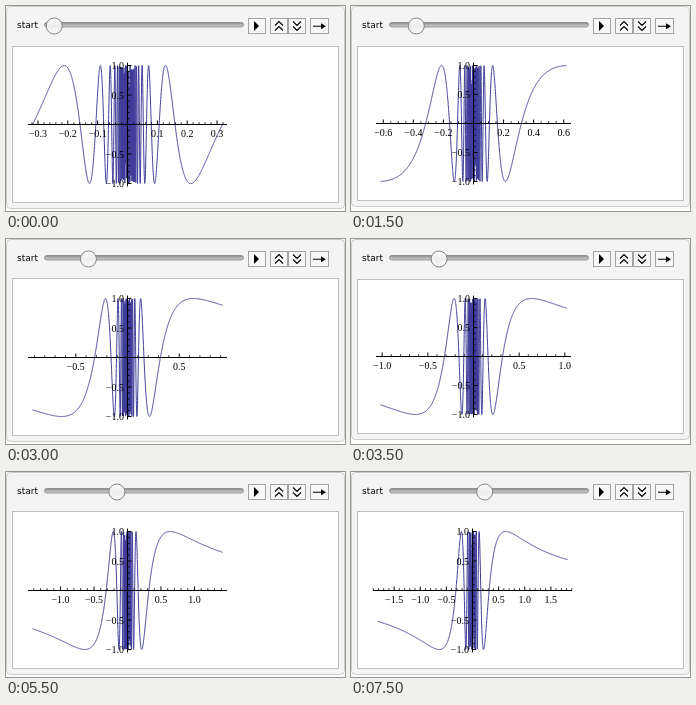
Recreate the animation shown at these times as an HTML page. Size 339 by 205 pixels, loop 8000 ms.

```html
<!DOCTYPE html>
<html lang="en">
<head>
<meta charset="utf-8">
<title>sin(1/x) explorer</title>
<style>
  html, body { margin: 0; width: 100%; height: 100%; overflow: hidden; background: #fff; }
  svg { display: block; width: 339px; height: 205px; }
  .label { font: 9px "DejaVu Sans", sans-serif; }
  .ticks text { font: 10px "Liberation Serif", serif; }
  #curve { fill: none; stroke: #3f3d99; stroke-width: 1; stroke-linejoin: round; }
  #axes { fill: none; stroke: #000; stroke-width: 1; }
  #minor { fill: none; stroke: #000; stroke-width: .8; }
  .button rect { fill: #f7f7f7; stroke: #a3a3a3; }
  .icon { fill: none; stroke: #000; stroke-width: 1.1; }
</style>
</head>
<body>
<svg viewBox="0 0 339 205">
  <defs>
    <linearGradient id="groove" x2="0" y2="1">
      <stop offset="0" stop-color="#858585"/>
      <stop offset=".5" stop-color="#b4b4b4"/>
      <stop offset="1" stop-color="#d2d2d2"/>
    </linearGradient>
    <linearGradient id="knob" x2="0" y2="1">
      <stop offset="0" stop-color="#fff"/>
      <stop offset=".5" stop-color="#ededed"/>
      <stop offset="1" stop-color="#fafafa"/>
    </linearGradient>
  </defs>

  <rect id="frame" x=".5" y=".5" width="338" rx="4" fill="#f4f4f4" stroke="#cbcbcb"/>
  <rect id="panel" x="6.5" width="326" fill="#fff" stroke="#c0c0c0"/>

  <text class="label" x="11" y="22">start</text>
  <rect x="38.5" y="16.5" width="199" height="4.5" rx="2.2" fill="url(#groove)" stroke="#858585" stroke-width=".8"/>
  <circle id="thumb" cy="20" r="8" fill="url(#knob)" stroke="#858585"/>

  <g class="button">
    <rect x="242.5" y="12.5" width="17" height="15"/>
    <rect x="264.5" y="12.5" width="17" height="15"/>
    <rect x="282.5" y="12.5" width="17" height="15"/>
    <rect x="304.5" y="12.5" width="18" height="15"/>
  </g>
  <path d="M248 15v10l5-5z"/>
  <path class="icon" d="M269 19.5l4-4 4 4M269 24.5l4-4 4 4M287 15.5l4 4 4-4M287 20.5l4 4 4-4M307 20.2h9"/>
  <path d="M315 17.2v6l5-3z"/>

  <path id="curve"/>
  <path id="minor"/>
  <path id="axes"/>
  <g id="ticks" class="ticks"></g>
</svg>
<script>
const STEP_MS = 500, STEPS = 16;
const $ = id => document.getElementById(id);
const set = (id, attrs) => {
  for (const key in attrs) $(id).setAttribute(key, attrs[key]);
};
const format = v => v.toFixed(1).replace("-", "\u2212");
const label = (x, y, anchor, v) =>
  `<text x="${x.toFixed(2)}" y="${y.toFixed(2)}" text-anchor="${anchor}">${format(v)}</text>`;

function curvePath(a, plot) {
  const points = [];
  const count = Math.round(plot.half * 20);
  for (let i = 0; i <= count; i++) {
    const u = 2 * i / count - 1;
    const y = u ? Math.sin(1 / (a * u)) : 0;
    points.push((plot.cx + u * plot.half).toFixed(2) + " " + (plot.cy - y * plot.amp).toFixed(2));
  }
  return "M" + points.join("L");
}

function draw(k) {
  const a = 1 / Math.PI + k * 0.1;
  const major = [0.1, 0.2, 0.5].find(s => a / s < 4);
  const minor = { 0.1: 0.02, 0.2: 0.05, 0.5: 0.1 }[major];

  // A label close to the edge squeezes the plot.
  const edge = Math.floor(a / major) * major / a;
  const tight = edge > 0.965;
  const top = edge > 0.93 ? 40.5 : 39.5;
  const plot = tight
    ? { cx: 122.5, cy: 117.5, half: 93, amp: 58, reach: 97.5 }
    : { cx: 121.5, cy: 118.5, half: 95, amp: 59, reach: 99.5 };
  const { cx, cy, half, amp, reach } = plot;
  const scale = half / a;

  set("frame", { height: tight ? 200 : 202 });
  set("panel", { y: top, height: (tight ? 194.5 : 196.5) - top });
  set("thumb", { cx: 48.2 + 5.7 * k });
  set("curve", { d: curvePath(a, plot) });

  let axes = `M${cx - reach} ${cy}h${2 * reach}M${cx} ${cy - amp * 1.05}v${amp * 2.1}`;
  let small = "", text = "";

  const last = Math.floor(reach / scale / minor);
  const ratio = Math.round(major / minor);
  for (let i = -last; i <= last; i++) {
    const v = i * minor, x = cx + v * scale;
    if (i % ratio) {
      small += `M${x.toFixed(2)} ${cy}v-2.3`;
    } else if (i) {
      axes += `M${x.toFixed(2)} ${cy}v-4`;
      text += label(x, cy + 12.7, "middle", v);
    }
  }
  for (let i = -10; i <= 10; i++) {
    const y = cy - i / 10 * amp;
    if (i % 5) {
      small += `M${cx} ${y.toFixed(2)}h2.3`;
    } else if (i) {
      axes += `M${cx} ${y.toFixed(2)}h4`;
      text += label(cx - 3.5, y + 3.8, "end", i / 10);
    }
  }
  set("axes", { d: axes });
  set("minor", { d: small });
  $("ticks").innerHTML = text;
}

const start = performance.now();
let shown = -1;
function tick() {
  const k = Math.floor((performance.now() - start) / STEP_MS) % STEPS;
  if (k !== shown) draw(shown = k);
  requestAnimationFrame(tick);
}
tick();
</script>
</body>
</html>
```
